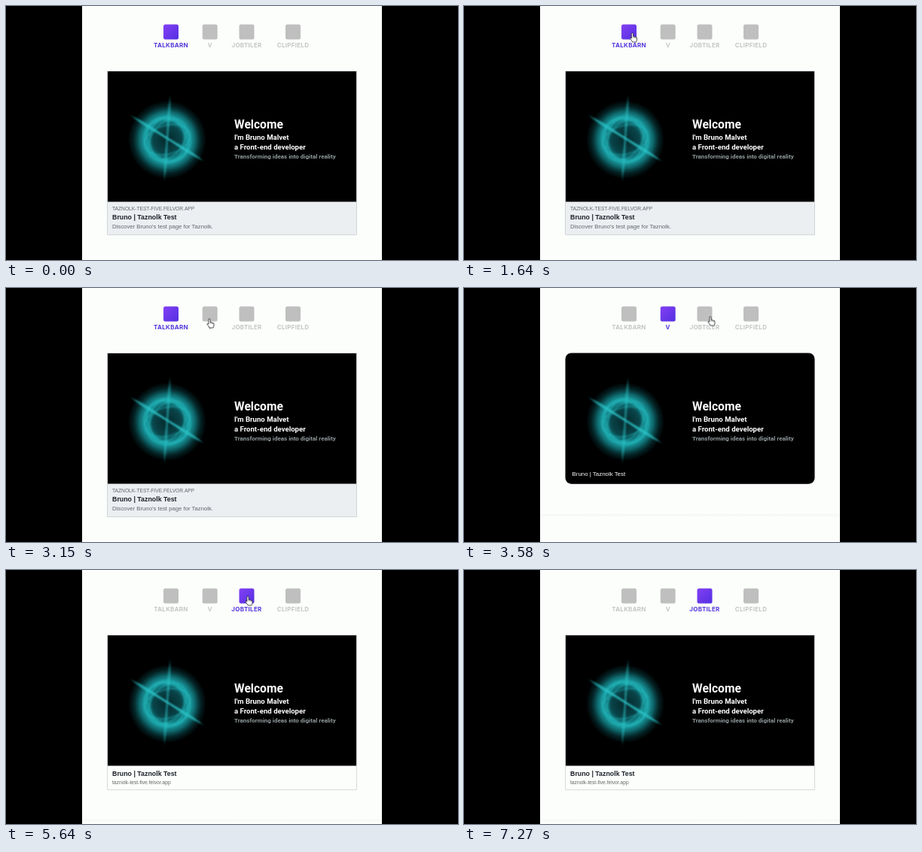
An HTML page that plays this animation: 600x338 px, repeating every 7300 ms.

```html
<!DOCTYPE html>
<html lang="en">
<head>
<meta charset="utf-8">
<title>Share preview</title>
<style>
  html, body { margin: 0; width: 100%; height: 100%; overflow: hidden; background: #000; }
  svg { display: block; width: 600px; height: 338px; }
  text { font-family: "Liberation Sans", Arial, sans-serif; }
  .hero text { font-family: Roboto, sans-serif; font-weight: 700; fill: #fff; }
  .tab { fill: #bfbfbf; }
  .tab text { font: 600 8px Inter, sans-serif; letter-spacing: .3px; text-anchor: middle; }
  .tab.on rect { fill: url(#violet); }
  .tab.on text { fill: #5537dc; font-weight: 700; }
  .title { font-size: 8.84px; font-weight: 700; fill: #1d2129; }
  .glow { fill: none; stroke: #27bfc4; }
  .ray { fill: #2cc4c8; }
</style>
</head>
<body>
<svg viewBox="0 0 600 338">
  <defs>
    <linearGradient id="violet" x2="1" y2="1">
      <stop stop-color="#8340f2"/><stop offset="1" stop-color="#5330e2"/>
    </linearGradient>
    <linearGradient id="edge" x2="0" y2="1">
      <stop stop-color="#f5f7f5"/><stop offset="1" stop-color="#fbfefb"/>
    </linearGradient>
    <radialGradient id="halo">
      <stop stop-color="#04282b"/>
      <stop offset=".35" stop-color="#094348"/>
      <stop offset=".56" stop-color="#128085"/>
      <stop offset=".72" stop-color="#0d5f63"/>
      <stop offset=".86" stop-color="#042224"/>
      <stop offset="1" stop-color="#000"/>
    </radialGradient>
    <filter id="soft" x="-50%" y="-50%" width="200%" height="200%"><feGaussianBlur stdDeviation="3"/></filter>
    <filter id="thin" x="-20%" y="-20%" width="140%" height="140%"><feGaussianBlur stdDeviation=".9"/></filter>
    <clipPath id="panel"><path d="M101 0H499V338H101z"/></clipPath>
  </defs>

  <path fill="#fbfefb" d="M101 0H499V338H101z"/>
  <rect id="fold" x="101" width="398" height="4" fill="url(#edge)"/>
  <g id="tabs"></g>

  <g class="card">
    <path fill="#eceff1" stroke="#d3d6d9" d="M134.5 86.5H465.5V304.5H134.5z"/>
    <text x="141" y="272.3" font-size="6.66" fill="#606770">TAZNOLK-TEST-FIVE.FELVOR.APP</text>
    <text x="141" y="284" class="title">Bruno | Taznolk Test</text>
    <text x="141" y="296" font-size="7.75" fill="#606770">Discover Bruno's test page for Taznolk.</text>
  </g>
  <g class="card">
    <rect x="134.5" y="86.5" width="331" height="174" rx="8"/>
  </g>
  <g class="card">
    <path fill="#fbfefb" stroke="#d9dbdb" d="M134.5 86.5H465.5V292.5H134.5z"/>
    <text x="141" y="274" class="title">Bruno | Taznolk Test</text>
    <text x="141" y="285" font-size="6.7" fill="#666">taznolk-test-five.felvor.app</text>
  </g>

  <g class="hero">
    <rect id="cover" x="135" y="87" width="330" height="173.5"/>
    <g transform="translate(214 178)">
      <circle r="52" fill="url(#halo)"/>
      <circle class="glow" r="30" stroke-width="8" opacity=".5" filter="url(#soft)"/>
      <g id="rings" filter="url(#thin)"></g>
      <g id="rays" filter="url(#thin)"></g>
    </g>
    <text x="303" y="162.5" font-size="15.6">Welcome</text>
    <text x="303" y="177.5" font-size="9.6">I'm Bruno Malvet</text>
    <text x="303" y="190.8" font-size="9.6">a Front-end developer</text>
    <text x="303" y="203" font-size="8" style="fill:#8f9a9b;font-weight:600">Transforming ideas into digital reality</text>
  </g>
  <text id="caption" x="143.5" y="250" font-size="7.9" fill="#fff">Bruno | Taznolk Test</text>

  <g clip-path="url(#panel)">
    <g id="cursor" fill="#fff" stroke="#222" stroke-width=".8" stroke-linejoin="round">
      <path id="arrow" d="M0 0V10L2.3 7.8 3.9 11.5 5.5 10.8 3.9 7.2H7z"/>
      <g id="hand">
        <path d="M-1.1 1.1a1.1 1.1 0 0 1 2.2 0V4.5q1.3-.5 1.8.5 1.2-.4 1.7.6 1.4-.3 1.4 1.2V8.8Q6 10.3 5 12H.1Q-.6 10.3-1.9 8.9-3.4 7.2-2.9 6.6-2.2 5.9-1.1 7.1z"/>
        <path fill="none" stroke-width=".5" d="M1.1 4.5v2M2.9 5v1.8M4.6 5.6v1.6"/>
      </g>
    </g>
  </g>
</svg>
<script>
const LOOP = 7300;
const $ = id => document.getElementById(id);
const show = (el, on) => { el.style.display = on ? '' : 'none'; };

const TABS = [
  { name: 'TALKBARN', x: 219, half: 23 },
  { name: 'V', x: 270.7, half: 10 },
  { name: 'JOBTILER', x: 319.5, half: 20 },
  { name: 'CLIPFIELD', x: 381, half: 22 }
];
const VIEWS = [
  { from: 0, cardEnd: 305 },
  { from: 3330, cardEnd: 260 },
  { from: 5490, cardEnd: 291 }
];
const START = { x: 92, y: 24 };
const MOVES = [
  { from: 180, to: 910, x: 208, y: 17 },
  { from: 1360, to: 1620, x: 223.5, y: 36 },
  { from: 2180, to: 2700, x: 270, y: 41 },
  { from: 3360, to: 3580, x: 327, y: 38 },
  { from: 4850, to: 5090, x: 321, y: 35 },
  { from: 6180, to: 6300, x: 301, y: 39 },
  { from: 6300, to: 6880, x: 92, y: 33 }
];

const repeat = (n, make) => Array.from({ length: n }, (_, i) => make(i)).join('');

$('tabs').innerHTML = TABS.map(({ name, x }) =>
  `<g class="tab"><rect x="${x - 10}" y="24.5" width="20" height="20" rx="2.5"/>` +
  `<text x="${x}" y="55">${name}</text></g>`).join('');

$('rings').innerHTML = repeat(5, i =>
  `<ellipse class="glow" rx="31" ry="${27 - 2 * i}" transform="rotate(${20 + 36 * i})" stroke-width="1.6" opacity=".5"/>`);

const ray = (x, length, width, opacity) =>
  `<path class="ray" d="M${x - length} 0Q${x} ${-2 * width} ${x + length} 0Q${x} ${2 * width} ${x - length} 0z" opacity="${opacity}"/>`;

// each axis: a long beam with a wider flare at both ends
$('rays').innerHTML = [32, 94].map((angle, i) =>
  `<g transform="translate(0 -2) rotate(${angle})" opacity="${1 - i * .35}">` +
  ray(0, 59, 1.3, .9) + ray(-30, 25, 2.4, .5) + ray(30, 25, 2.4, .5) + '</g>').join('');

const tabs = [...document.querySelectorAll('.tab')];
const cards = [...document.querySelectorAll('.card')];

function pointer(t) {
  let { x, y } = START;
  for (const move of MOVES) {
    const u = Math.min(1, Math.max(0, (t - move.from) / (move.to - move.from)));
    const k = u * u * (3 - 2 * u);
    x += (move.x - x) * k;
    y += (move.y - y) * k;
  }
  return { x, y };
}

function draw(t) {
  const active = VIEWS.findLastIndex(view => view.from <= t);
  tabs.forEach((tab, i) => tab.classList.toggle('on', i === active));
  cards.forEach((card, i) => show(card, i === active));
  show($('caption'), active === 1);
  $('cover').setAttribute('rx', active === 1 ? 8 : 0);
  $('fold').setAttribute('y', VIEWS[active].cardEnd + 41);

  const { x, y } = pointer(t);
  const hover = y > 24 && y < 57 && TABS.some(tab => Math.abs(x - tab.x) <= tab.half);
  show($('hand'), hover);
  show($('arrow'), !hover);
  $('cursor').setAttribute('transform', `translate(${x} ${y})`);
}

function tick() {
  draw(performance.now() % LOOP);
  requestAnimationFrame(tick);
}
tick();
</script>
</body>
</html>
```
